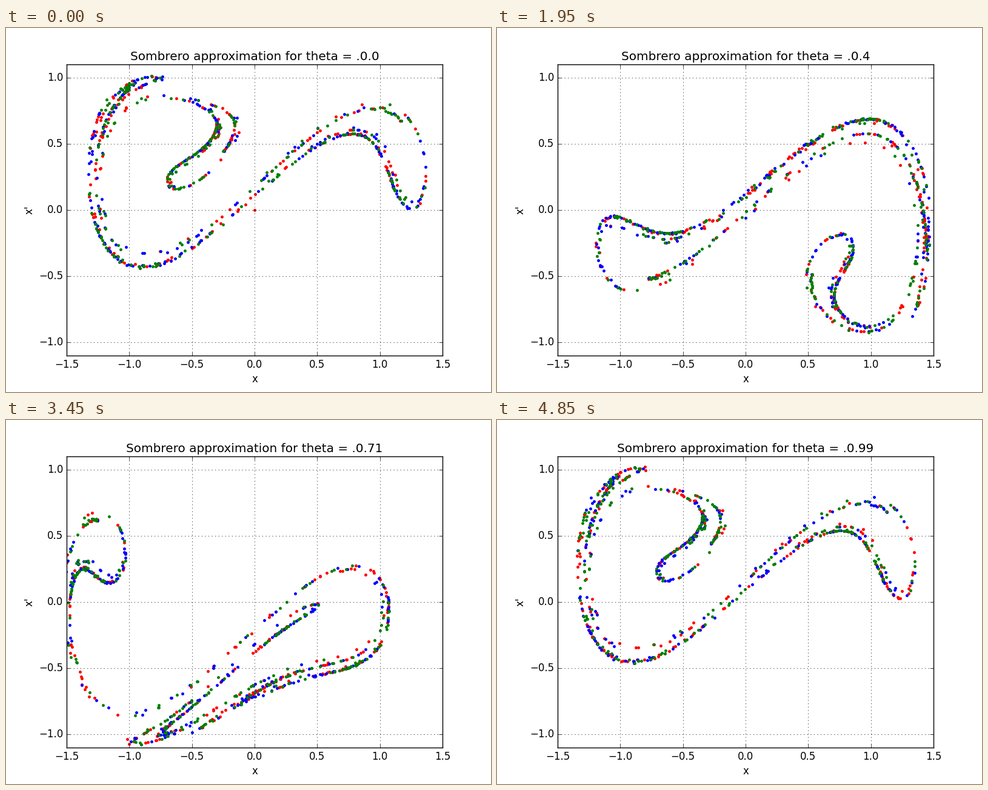
A matplotlib script that plays this animation: 800 px wide and 600 px high, repeating every 4900 ms.

```python
import math

import numpy as np
import matplotlib.pyplot as plt
from matplotlib.animation import FuncAnimation

plt.style.use("classic")
plt.rcParams.update({
    "font.family": "DejaVu Sans",
    "figure.facecolor": "white",
    "savefig.facecolor": "white",
})

# Driven, damped motion in a double-well potential
DAMPING = 0.25
FORCE = 0.4
STEPS = 100          # integration steps per drive period
PERIODS = 800
DT = 2 * math.pi / STEPS
COLORS = ("red", "blue", "green")

# Drive phases in hundredths of a period; two of them are skipped
PHASES = [k for k in range(STEPS) if k not in (28, 56)]


def accel(x, v, drive):
    return x - x * x * x - DAMPING * v + drive


def trajectory():
    """Runge-Kutta path from rest, as position and velocity [period, phase]."""
    drive = [FORCE * math.cos(i * DT / 2) for i in range(2 * STEPS + 1)]
    path = np.empty((PERIODS * STEPS, 2))
    x = v = 0.0
    h = DT / 2
    for n in range(len(path)):
        path[n] = x, v
        i = 2 * (n % STEPS)
        start, mid, end = drive[i:i + 3]
        a1 = accel(x, v, start)
        v2 = v + h * a1
        a2 = accel(x + h * v, v2, mid)
        v3 = v + h * a2
        a3 = accel(x + h * v2, v3, mid)
        v4 = v + DT * a3
        a4 = accel(x + DT * v3, v4, end)
        x += DT * (v + 2 * v2 + 2 * v3 + v4) / 6
        v += DT * (a1 + 2 * a2 + 2 * a3 + a4) / 6
    return path.reshape(PERIODS, STEPS, 2)


path = trajectory()

fig = plt.figure(figsize=(8, 6), dpi=100)
ax = fig.add_axes([0.125, 0.1, 0.775, 0.8])
ax.set_xlim(-1.5, 1.5)
ax.set_ylim(-1.1, 1.1)
ax.set_xticks(np.arange(-1.5, 1.6, 0.5))
ax.set_yticks(np.arange(-1.0, 1.1, 0.5))
ax.set_xlabel("x")
ax.set_ylabel("x'")
ax.grid(True)
title = ax.set_title("")
dots = [ax.plot([], [], ".", color=c, mec=c, ms=6, mew=0.5)[0] for c in COLORS]


def draw(frame):
    phase = PHASES[frame]
    title.set_text(f"Sombrero approximation for theta = .{phase / 100}")
    for i, line in enumerate(dots):
        line.set_data(*path[i::len(dots), phase].T)
    return [title, *dots]


anim = FuncAnimation(fig, draw, frames=len(PHASES), interval=50,
                     repeat=True, repeat_delay=0, blit=False)
plt.show()
```
